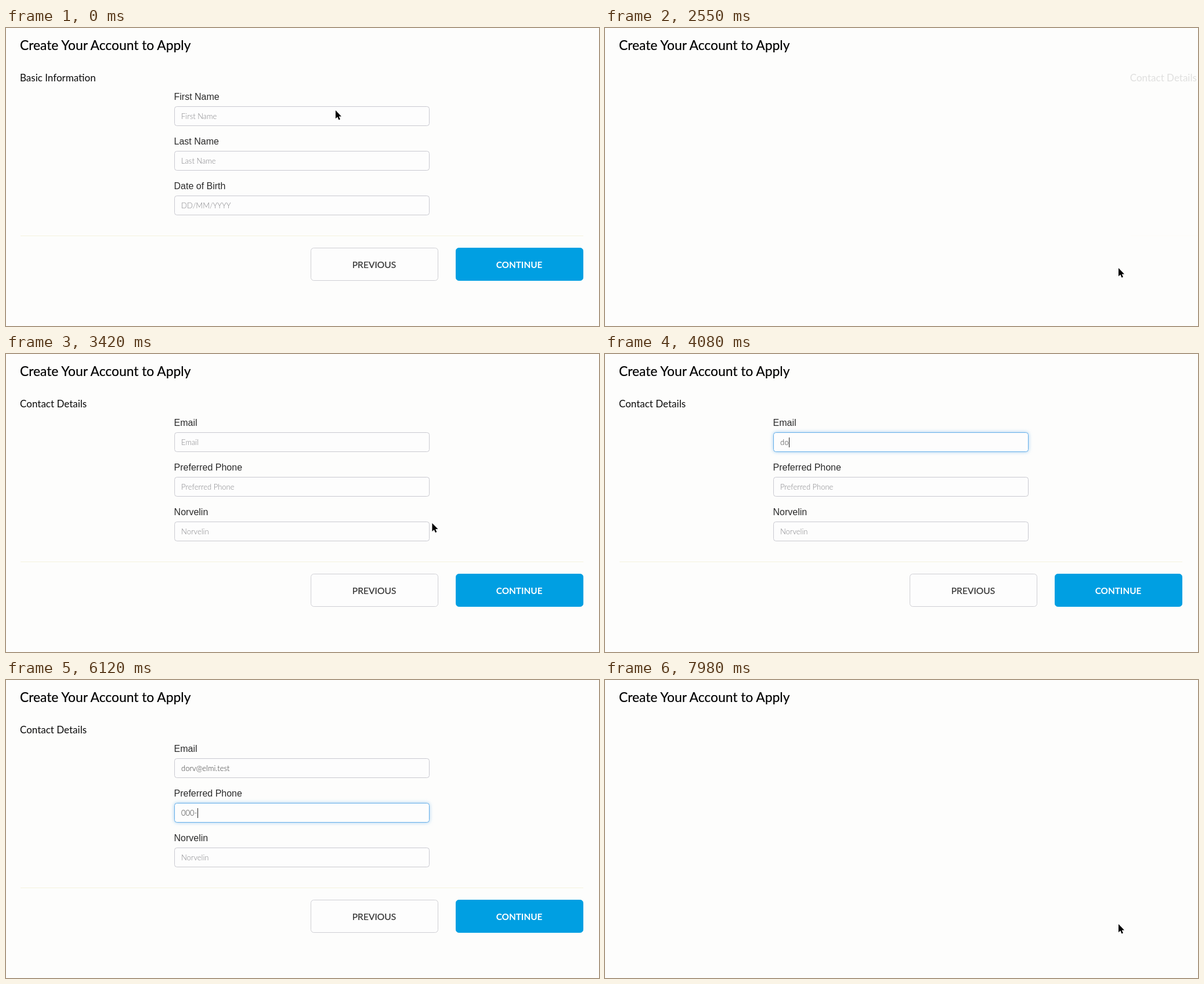
Recreate the animation shown at these times as an HTML page. Size 1022 by 514 pixels, loop 8000 ms.

```html
<!DOCTYPE html>
<html lang="en">
<head>
<meta charset="utf-8">
<title>Account form</title>
<style>
  html, body { margin: 0; width: 100%; height: 100%; overflow: hidden; background: #fdfdfc; }
  svg { display: block; width: 100%; height: 100%; }
  text { font-family: Lato, "Open Sans", sans-serif; fill: #0a0a0a; white-space: pre; }
  .title { font-size: 22.8px; fill: #000; stroke: #000; stroke-width: .2px; }
  .head { font-size: 17px; }
  .label { font: 16px "Liberation Sans", Arial, sans-serif; fill: #2a2a2a; }
  .value { font-size: 13px; font-weight: 300; fill: #333; }
  .value.empty { fill: #828286; }
  .box { fill: #fdfdfd; stroke: #c9c9d0; }
  .box.focus { stroke: #66afe9; filter: drop-shadow(0 0 3px rgba(102, 175, 233, .6)); }
  .button { font-size: 15.6px; text-anchor: middle; fill: #333; stroke: #333; stroke-width: .2px; }
  .button.main { font-size: 15.3px; font-weight: 700; fill: #fff; stroke: none; }
</style>
</head>
<body>
<svg id="stage" viewBox="0 0 1022 514"></svg>
<script>
const LOOP = 8000, SWAP = 2436, LEAVE = 7940, SLIDE = 1000, PAGE_WIDTH = 1000;
const BLUE = '#009fe2';
const stage = document.getElementById('stage');

// Each field may gain focus, receive keystrokes and lose focus.
const pages = [
  { head: 'Basic Information', from: 0, to: SWAP, fields: [
    { label: 'First Name', text: 'Dorv', focus: 850, type: 1130, step: 110, blur: 2330 },
    { label: 'Last Name' },
    { label: 'Date of Birth', hint: 'DD/MM/YYYY' }
  ] },
  { head: 'Contact Details', from: SWAP, to: LEAVE, slides: true, fields: [
    { label: 'Email', text: 'dorv@elmi.test', focus: 3790, type: 3930, step: 105, blur: 5620 },
    { label: 'Preferred Phone', text: '000-000-0000', focus: 5620, type: 5760, step: 100, blur: 7780 },
    { label: 'Norvelin' }
  ] }
];

// Pointer stops: time, x, y
const stops = [
  [0, 568, 142], [450, 568, 150], [1850, 568, 150], [2270, 885, 414],
  [3150, 885, 414], [3720, 560, 150], [7200, 560, 150], [7680, 885, 421], [LOOP, 885, 421]
];
const hidden = [[1130, 1850], [3930, 7200]];

function add(parent, tag, attrs, text) {
  const el = document.createElementNS('http://www.w3.org/2000/svg', tag);
  for (const key in attrs) el.setAttribute(key, attrs[key]);
  if (text) el.textContent = text;
  parent.appendChild(el);
  return el;
}

function addButton(g, x, name, main) {
  add(g, 'rect', { x: x + .5, y: 379.5, width: 219, height: 56, rx: 5,
    fill: main ? BLUE : '#fdfdfd', stroke: main ? BLUE : '#cfcfd4' });
  add(g, 'text', { x: x + 109.5, y: 413.5, class: main ? 'button main' : 'button' }, name);
}

function buildPage(page) {
  const g = page.el = add(stage, 'g', {});
  add(g, 'text', { x: 24, y: 92, class: 'head' }, page.head);
  page.fields.forEach((f, i) => {
    const y = 135 + i * 77;
    add(g, 'text', { x: 289.5, y: y - 11, class: 'label' }, f.label);
    f.box = add(g, 'rect', { x: 290.5, y: y + .5, width: 439, height: 33, rx: 4, class: 'box' });
    f.value = add(g, 'text', { x: 302, y: y + 22, class: 'value empty' }, f.hint || f.label);
    f.caret = add(g, 'rect', { y: y + 9, width: 1, height: 17, fill: '#222' });
  });
  add(g, 'path', { d: 'M25 358.5H995', stroke: '#f5f3de' });
  addButton(g, 525, 'PREVIOUS', false);
  addButton(g, 775, 'CONTINUE', true);
}

add(stage, 'text', { x: 24, y: 38, class: 'title' }, 'Create Your Account to Apply');
pages.forEach(buildPage);
const arrow = add(stage, 'path', { d: 'M0 0V14.2L3.3 11.2 5.5 16.4 7.9 15.4 5.7 10.4H10Z',
  fill: '#000', stroke: '#fff', 'stroke-width': 1, 'paint-order': 'stroke' });
const hand = add(stage, 'path', {
  d: 'M-2 0Q0-2 1 1L2.6 5Q4 4 5 5.5Q6.5 5 7.3 6.4Q9 6 9.2 9V13L8 17H0L-4.6 10.2Q-5.3 8-3 8.4L-.6 10.4L-2.6 2Z M2.6 5L3.4 8M5 5.5L5.7 8.4M7.3 6.4L7.7 9M2 11V15M4.3 11V15M6.5 11V15',
  fill: '#fff', stroke: '#000', 'stroke-width': 1, 'stroke-linejoin': 'round' });

const show = (el, on) => el.setAttribute('visibility', on ? 'inherit' : 'hidden');
const bezier = (a, b, s) => 3 * a * s * (1 - s) ** 2 + 3 * b * s * s * (1 - s) + s ** 3;

// Same curve as the CSS "ease" keyword
function ease(p) {
  let lo = 0, hi = 1;
  for (let i = 0; i < 24; i++) {
    const mid = (lo + hi) / 2;
    if (bezier(.25, .25, mid) < p) lo = mid; else hi = mid;
  }
  return bezier(.1, 1, lo);
}

function drawField(f, t) {
  const count = f.text && t >= f.type
    ? Math.min(f.text.length, Math.floor((t - f.type) / f.step) + 1) : 0;
  const typed = count ? f.text.slice(0, count) : '';
  const text = typed || f.hint || f.label;
  if (f.value.textContent !== text) f.value.textContent = text;
  f.value.classList.toggle('empty', !typed);
  const focused = t >= f.focus && t < f.blur;
  f.box.classList.toggle('focus', focused);
  show(f.caret, focused);
  if (focused) f.caret.setAttribute('x', typed ? Math.round(302.5 + f.value.getComputedTextLength()) : 302);
}

function drawPage(page, t) {
  const on = t >= page.from && t < page.to;
  page.el.setAttribute('display', on ? 'inline' : 'none');
  if (!on) return null;
  const p = page.slides ? ease(Math.min(1, (t - page.from) / SLIDE)) : 1;
  const shift = PAGE_WIDTH * (1 - p);
  page.el.setAttribute('transform', `translate(${shift} 0)`);
  page.el.setAttribute('opacity', p);
  page.fields.forEach(f => drawField(f, t));
  return shift;
}

function pointerAt(t) {
  const i = stops.findIndex(s => s[0] > t);
  const [t0, x0, y0] = stops[i - 1], [t1, x1, y1] = stops[i];
  const p = (t - t0) / (t1 - t0), s = p * p * (3 - 2 * p);
  return [x0 + (x1 - x0) * s, y0 + (y1 - y0) * s];
}

function draw(t) {
  const shifts = pages.map(page => drawPage(page, t));
  const shift = shifts.find(s => s !== null);
  const [x, y] = pointerAt(t);
  const seen = !hidden.some(([a, b]) => t >= a && t < b);
  const over = [525, 775].some(left =>
    x >= left + shift && x <= left + 220 + shift && y >= 379 && y <= 436);
  for (const el of [arrow, hand]) el.setAttribute('transform', `translate(${x} ${y})`);
  show(arrow, seen && !over);
  show(hand, seen && over);
}

function frame() {
  draw(performance.now() % LOOP);
  requestAnimationFrame(frame);
}
frame();
</script>
</body>
</html>
```
